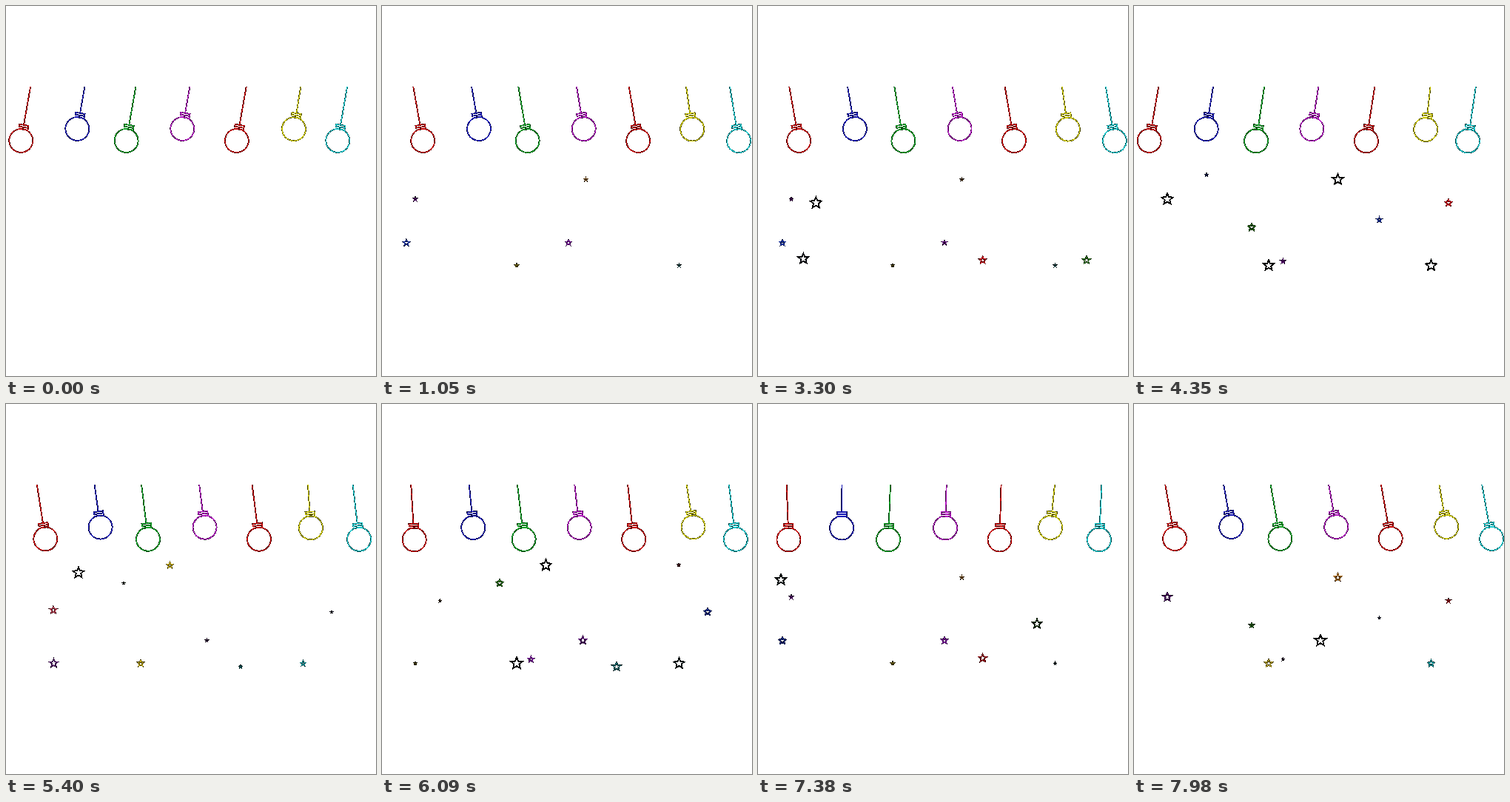
These frames come from a looping animation (500 by 500 pixels, 8 s). An HTML page:

```html
<!DOCTYPE html>
<html lang="en">
<head>
<meta charset="utf-8">
<title>Swinging baubles</title>
<style>
  html, body { margin: 0; width: 100%; height: 100%; overflow: hidden; background: #fff; }
  svg { display: block; width: 100%; height: 100%; }
</style>
</head>
<body>
<svg id="stage" viewBox="0 0 500 500" fill="none" shape-rendering="crispEdges">
  <clipPath id="below"><rect y="109" width="500" height="391"/></clipPath>
  <g id="baubles" clip-path="url(#below)"></g>
  <g id="stars"></g>
</svg>
<script>
const LOOP = 8000, SWING = 2260, TRAVEL = 1000, REACH = 10, LENGTH = 100.5;
const LIFE = 1450, GROWTH = 0.0061;

const RED = [208, 0, 0], BLUE = [24, 24, 190], GREEN = [16, 170, 40], PURPLE = [190, 24, 205],
      YELLOW = [215, 210, 0], CYAN = [24, 210, 215];

// pivot x, pivot y, lag in ms, colour
const baubles = [
  [37.7, 83, 0, RED], [113.8, 67, 67, BLUE], [180, 83, 117, GREEN], [255.8, 67, 97, PURPLE],
  [329.3, 83, 99, RED], [405.2, 67, 230, YELLOW], [465.7, 83, 130, CYAN]
];

const ROSE = [200, 70, 90], ORANGE = [220, 140, 40], GOLD = [205, 180, 20], TEAL = [20, 165, 170],
      VIOLET = [125, 25, 160], NAVY = [25, 50, 160], LEAF = [50, 130, 30], SCARLET = [215, 15, 25];

// x, y, colour, birth times
const stars = [
  [33, 320, NAVY, 300, 2640, 6500],
  [252, 319.7, VIOLET, 400, 2800, 6600],
  [45, 261, VIOLET, 640, 2970, 6980],
  [182, 350.5, GOLD, 720, 3050, 4650, 7060],
  [275.5, 234.5, ORANGE, 720, 3050, 7060],
  [401.5, 350.7, TEAL, 800, 3050, 4820, 7230],
  [159, 299, LEAF, 1200, 3450, 7480],
  [425, 266, SCARLET, 1280, 3530, 7560],
  [331.5, 289, NAVY, 1530, 3780, 7810],
  [201.3, 345, VIOLET, 1610, 3860, 5400, 7810],
  [287, 223, SCARLET, 1830],
  [357, 348, GOLD, 1845],
  [78.3, 266, ORANGE, 1910, 5920],
  [61.3, 341.5, NAVY, 2030],
  [444, 343.5, LEAF, 2390],
  [303.7, 343.5, SCARLET, 2470, 6420],
  [98, 228, NAVY, 4070],
  [64.5, 350.5, VIOLET, 4410],
  [64, 278.5, ROSE, 4570],
  [221.5, 218, GOLD, 4730],
  [317, 355, TEAL, 5070],
  [271.5, 319.5, VIOLET, 5150],
  [159, 242, LEAF, 5230],
  [440, 281, NAVY, 5230],
  [401, 217.5, ROSE, 5840],
  [45, 350.5, GOLD, 5840],
  [31, 237.5, CYAN, 6090],
  [377, 297, LEAF, 6250]
];

function add(parent, tag, attrs) {
  const node = document.createElementNS('http://www.w3.org/2000/svg', tag);
  for (const key in attrs) node.setAttribute(key, attrs[key]);
  return parent.appendChild(node);
}

const shade = (rgb, k) => `rgb(${rgb.map(v => Math.round(v * k)).join(',')})`;
const clamp = v => Math.min(1, Math.max(0, v));
const ease = u => u < 0.5 ? 2 * u * u : 1 - 2 * (1 - u) * (1 - u);

// String, wound cap and ball, hanging from the local origin
const BAUBLE = `M0 0V${LENGTH - 22}
  M6.5 ${LENGTH - 18.5}V${LENGTH - 21.5}H-6V${LENGTH - 18.5}H6.5V${LENGTH - 15.5}H-6
  M-16 ${LENGTH}a16 16 0 1 1 32 0a16 16 0 1 1 -32 0`;

const swingers = baubles.map(([x, y, lag, rgb]) => {
  const node = add(document.getElementById('baubles'), 'g', {});
  add(node, 'path', { d: BAUBLE, stroke: shade(rgb, 0.3), 'stroke-width': 1.9 });
  add(node, 'path', { d: BAUBLE, stroke: shade(rgb, 0.95), 'stroke-width': 1.1 });
  return { node, x, y, lag };
});

const sparks = stars.map(([x, y, rgb, ...births]) => {
  const node = add(document.getElementById('stars'), 'g', {});
  const edge = add(node, 'path', { 'stroke-width': 1.9 });
  const core = add(node, 'path', { 'stroke-width': 1 });
  return { x, y, rgb, births, node, edge, core };
});

function starPath(x, y, r) {
  const points = Array.from({ length: 10 }, (_, i) => {
    const d = i % 2 ? r * 0.45 : r, a = i * Math.PI / 5;
    return `${(x + d * Math.sin(a)).toFixed(2)} ${(y - d * Math.cos(a)).toFixed(2)}`;
  });
  return `M${points.join('L')}Z`;
}

// 0 at the far left, 1 at the far right, with a short rest at either end
function swing(t) {
  const p = (t + SWING) % SWING;
  return ease(clamp((p - 43) / TRAVEL)) - ease(clamp((p - 1164) / TRAVEL));
}

// Dark as a dot, bright at middle size, black when full grown
const brightness = r => (0.15 + 0.8 * clamp((r - 1) / 3)) * (1 - clamp((r - 5) / 3));

function draw(t) {
  for (const { node, x, y, lag } of swingers) {
    const angle = REACH * (1 - 2 * swing(t - lag));
    node.setAttribute('transform', `translate(${x} ${y}) rotate(${angle.toFixed(3)})`);
  }
  for (const { node, edge, core, x, y, rgb, births } of sparks) {
    const birth = births.find(b => t >= b && t < b + LIFE);
    node.setAttribute('visibility', birth === undefined ? 'hidden' : 'visible');
    if (birth === undefined) continue;
    const r = (t - birth) * GROWTH, d = starPath(x, y, r * 0.93), k = brightness(r);
    edge.setAttribute('d', d);
    edge.setAttribute('stroke', shade(rgb, k * 0.3));
    core.setAttribute('d', d);
    core.setAttribute('stroke', shade(rgb, k));
  }
}

const start = performance.now();
function tick() {
  const t = (performance.now() - start) % LOOP;
  draw(Math.floor(t / 30) * 30);
  requestAnimationFrame(tick);
}
tick();
</script>
</body>
</html>
```
